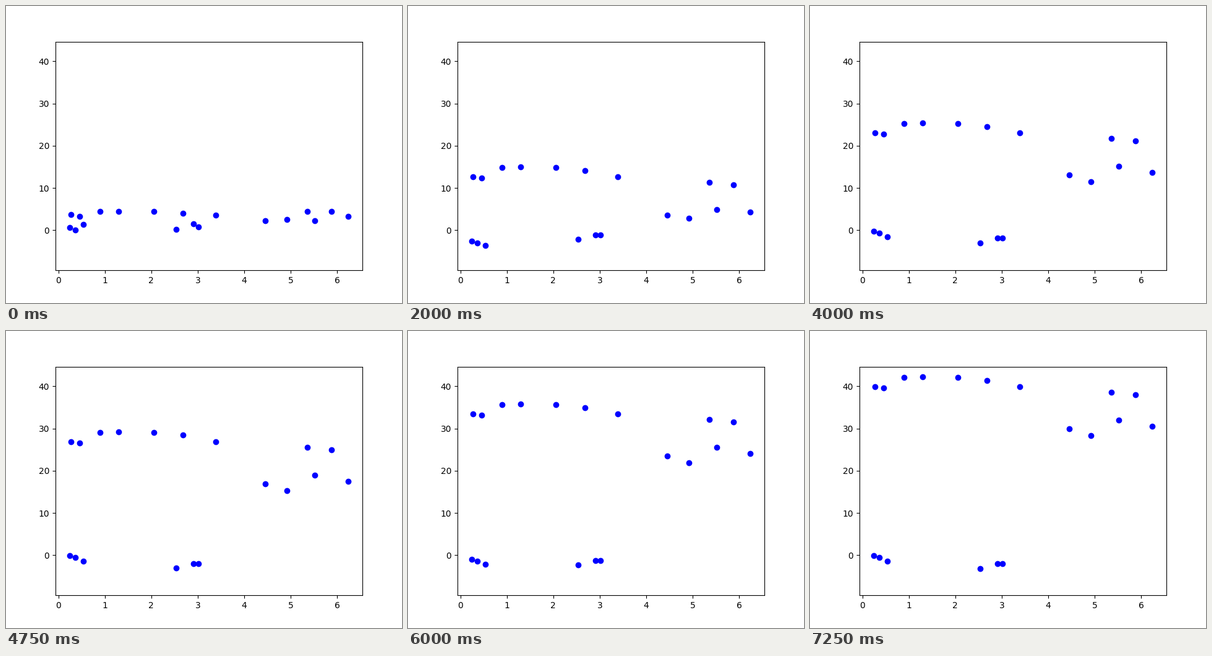
Animation of 640x480 px, one loop 7500 ms. Source, as a matplotlib script:

```python
import numpy as np
import matplotlib.pyplot as plt
from matplotlib.animation import FuncAnimation

FRAMES = 30
INTERVAL = 250
RATE = 1.3            # common climb per step once the dots move together

# Each dot: x, starting height, and final height or resting height
CLIMBERS = [
    (0.275, 3.74, 39.9), (0.46, 3.3, 39.6), (0.9, 4.47, 42.1),
    (1.297, 4.47, 42.25), (2.055, 4.47, 42.1), (2.682, 4.03, 41.4),
    (3.39, 3.6, 39.9), (4.452, 2.27, 29.95), (4.92, 2.55, 28.35),
    (5.357, 4.47, 38.6), (5.516, 2.27, 32.0), (5.88, 4.47, 38.0),
    (6.24, 3.3, 30.55),
]
DRIFTERS = [
    (0.24, 0.65, -0.5), (0.365, 0.05, -0.95), (0.54, 1.35, -1.8),
    (2.535, 0.2, -2.7), (2.907, 1.5, -1.6), (3.015, 0.8, -1.6),
]

climb_x, climb_start, climb_end = np.array(CLIMBERS).T
drift_x, drift_start, drift_rest = np.array(DRIFTERS).T


def climb(t):
    """Ease onto a straight climb; a larger gap takes longer to close."""
    line = climb_end - RATE * (FRAMES - 1 - t)
    gap = climb_start - climb_end + RATE * (FRAMES - 1)
    delay = 0.44 * np.maximum(np.abs(gap), 1)
    return line + gap * np.exp(-(t / delay) ** 1.5)


def drift(t):
    """Settle to rest with a small wobble; the left dots dip first."""
    left = drift_x < 1
    fade = np.exp(-t / 4)
    u = t / 3
    dip = 6 * (u * np.exp(1 - u)) ** 1.5
    wobble = 0.4 * np.cos(0.6 * np.pi * (t - 19)) * (1 - fade)
    return (drift_rest + (drift_start - drift_rest) * fade
            - dip * left + wobble * np.where(left, 1, -1))


fig, ax = plt.subplots(figsize=(6.4, 4.8), dpi=100)
ax.set_xlim(-0.06, 6.54)
ax.set_ylim(-9.49, 44.64)
xs = np.concatenate([climb_x, drift_x])
dots, = ax.plot(xs, np.zeros_like(xs), "bo")


def update(i):
    dots.set_ydata(np.concatenate([climb(i), drift(i)]))
    return dots,


anim = FuncAnimation(fig, update, frames=FRAMES, interval=INTERVAL,
                     repeat=True, repeat_delay=0)
plt.show()
```
